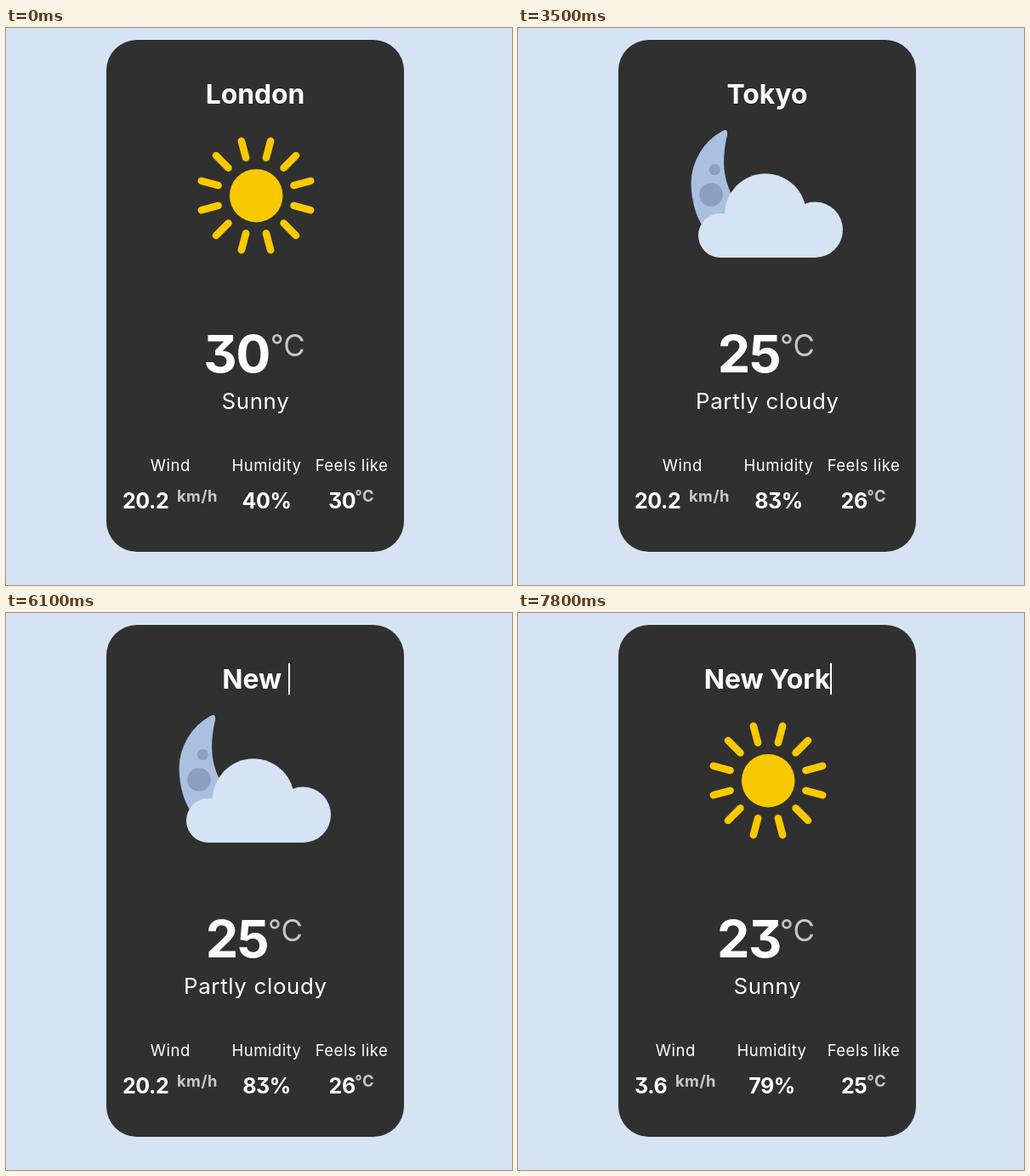
Animation of 595x655 px, one loop 8 s. Source, as an HTML page:

```html
<!DOCTYPE html>
<html lang="en">
<head>
<meta charset="utf-8">
<title>Weather card</title>
<style>
  html, body { margin: 0; width: 100%; height: 100%; overflow: hidden; background: #d6e3f3; }
  body {
    position: relative; color: #fff; font-family: Inter, sans-serif;
    font-feature-settings: "cv09"; /* flat-topped 3 */
  }
  svg { position: absolute; left: 0; top: 0; display: block; }
  text { fill: #fff; text-anchor: middle; }
  .city { position: absolute; left: 0; top: 59px; width: 586px; height: 37px; text-align: center; }
  #name {
    display: inline-block; position: relative; height: 37px; vertical-align: top;
    font-size: 31.8px; font-weight: 700; line-height: 37px; white-space: pre;
  }
  #caret { position: absolute; left: 100%; top: 0; width: 2px; height: 37px; background: #fff; }
  #temp { font-size: 61px; font-weight: 700; letter-spacing: -1.5px; }
  #degree { font-size: 34.8px; font-weight: 400; }
  #sky { font-size: 25.8px; font-weight: 400; letter-spacing: .7px; }
  .label { font-size: 18.5px; font-weight: 400; letter-spacing: .5px; }
  .value { font-size: 25px; font-weight: 700; letter-spacing: -.4px; }
  .unit { font-size: 18.4px; font-weight: 700; letter-spacing: .5px; text-anchor: end; }
  #degree, .unit { fill: #c8c8c8; }
  .start { text-anchor: start; }
</style>
</head>
<body>
<svg width="595" height="655" viewBox="0 0 595 655">
  <rect x="118" y="14" width="350" height="602" rx="36" fill="#303030"/>

  <g id="sun" fill="#f9c900" stroke="#f9c900">
    <circle cx="294.2" cy="197.2" r="31.3" stroke="none"/>
    <g id="rays" stroke-width="8.6" stroke-linecap="round"></g>
  </g>

  <g id="cloud">
    <path fill="#abbfe0" d="M241 120.8A71 71 0 0 0 203.5 183C204 205 210 222 217 233L252 230L251 195C242 177 239 156 246 126Q247 118 241 120.8Z"/>
    <g fill="#8c9fc2">
      <circle cx="231.3" cy="166.5" r="6.6"/>
      <circle cx="227" cy="196" r="13.8"/>
    </g>
    <g fill="#d6e3f3">
      <circle cx="238" cy="244" r="26"/>
      <circle cx="291" cy="219.3" r="48"/>
      <circle cx="349.2" cy="237.2" r="32.8"/>
      <rect x="238" y="237" width="111" height="33"/>
    </g>
  </g>

  <text id="temp" y="404.8"></text>
  <text id="degree" y="386">°C</text>
  <text id="sky" x="293.4" y="448"></text>

  <text id="windLabel" class="label" y="521">Wind</text>
  <text id="wetLabel" class="label" y="521">Humidity</text>
  <text class="label" x="406.5" y="521">Feels like</text>

  <text id="wind" class="value start" x="137" y="565"></text>
  <text id="speed" class="unit" y="557">km/h</text>
  <text id="wet" class="value" y="565"></text>
  <text id="feels" class="value" x="395.2" y="565"></text>
  <text class="unit" x="433" y="557">°C</text>
</svg>
<div class="city"><span id="name"><span id="city"></span><span id="caret"></span></span></div>

<script>
  const LOOP = 8000;
  const $ = id => document.getElementById(id);

  // [start in ms, typed text, caret shown]
  const typing = [
    [0, 'London', 0], [1100, 'London', 1], [1300, 'Londo', 1],
    [1900, 'Lond', 1], [2000, 'Lo', 1], [2100, 'L', 1], [2300, '', 1],
    [2400, 'T', 1], [2500, 'To', 1], [2700, 'Tok', 1], [2900, 'Toky', 1],
    [3100, 'Tokyo', 1], [3400, 'Tokyo', 0], [4200, 'Tokyo', 1],
    [4500, 'Toky', 1], [4700, 'Toky', 0], [5100, 'Tok', 1], [5200, '', 1],
    [5600, 'N', 1], [5800, 'Ne', 1], [5900, 'New', 1], [6100, 'New ', 1],
    [6400, 'New Y', 1], [6700, 'New Yo', 1], [6800, 'New Yor', 1],
    [6900, 'New York', 1], [7100, 'New York', 0], [7800, 'New York', 1]
  ];

  // shift moves the first two columns, tempX and degreeX centre the large reading
  const reports = [
    [0, { sunny: true, temp: 30, tempX: 271, degreeX: 331.3, wind: '20.2', wet: 40, feels: 30, shift: 0 }],
    [3500, { sunny: false, temp: 25, tempX: 271.5, degreeX: 328.5, wind: '20.2', wet: 83, feels: 26, shift: 0 }],
    [7200, { sunny: true, temp: 23, tempX: 271.5, degreeX: 328.5, wind: '3.6', wet: 79, feels: 25, shift: -8 }]
  ];

  const at = (steps, t) => steps.findLast(step => step[0] <= t);
  const setX = (id, x) => $(id).setAttribute('x', x);
  const show = (id, on) => { $(id).style.display = on ? '' : 'none'; };

  function addRays() {
    for (let i = 0; i < 12; i++) {
      const ray = document.createElementNS('http://www.w3.org/2000/svg', 'path');
      ray.setAttribute('d', 'M46 0H66.4');
      ray.setAttribute('transform', `translate(294 197) rotate(${15 + 30 * i})`);
      $('rays').append(ray);
    }
  }

  function showReport(r) {
    show('sun', r.sunny);
    show('cloud', !r.sunny);
    $('temp').textContent = r.temp;
    $('sky').textContent = r.sunny ? 'Sunny' : 'Partly cloudy';
    $('wind').textContent = r.wind;
    $('wet').textContent = r.wet + '%';
    $('feels').textContent = r.feels;
    setX('temp', r.tempX);
    setX('degree', r.degreeX);
    setX('windLabel', 193.3 + r.shift);
    setX('wetLabel', 306.5 + r.shift);
    setX('wet', 306.5 + r.shift);
    setX('speed', 249 + 2 * r.shift);
  }

  let lastKey, lastReport;
  function draw(now) {
    const t = now % LOOP;
    const key = at(typing, t);
    const report = at(reports, t);
    if (key !== lastKey) {
      $('city').textContent = key[1];
      show('caret', key[2]);
      lastKey = key;
    }
    if (report !== lastReport) {
      showReport(report[1]);
      lastReport = report;
    }
  }

  addRays();
  draw(0);
  const begin = performance.now();
  requestAnimationFrame(function tick() {
    draw(performance.now() - begin);
    requestAnimationFrame(tick);
  });
</script>
</body>
</html>
```
